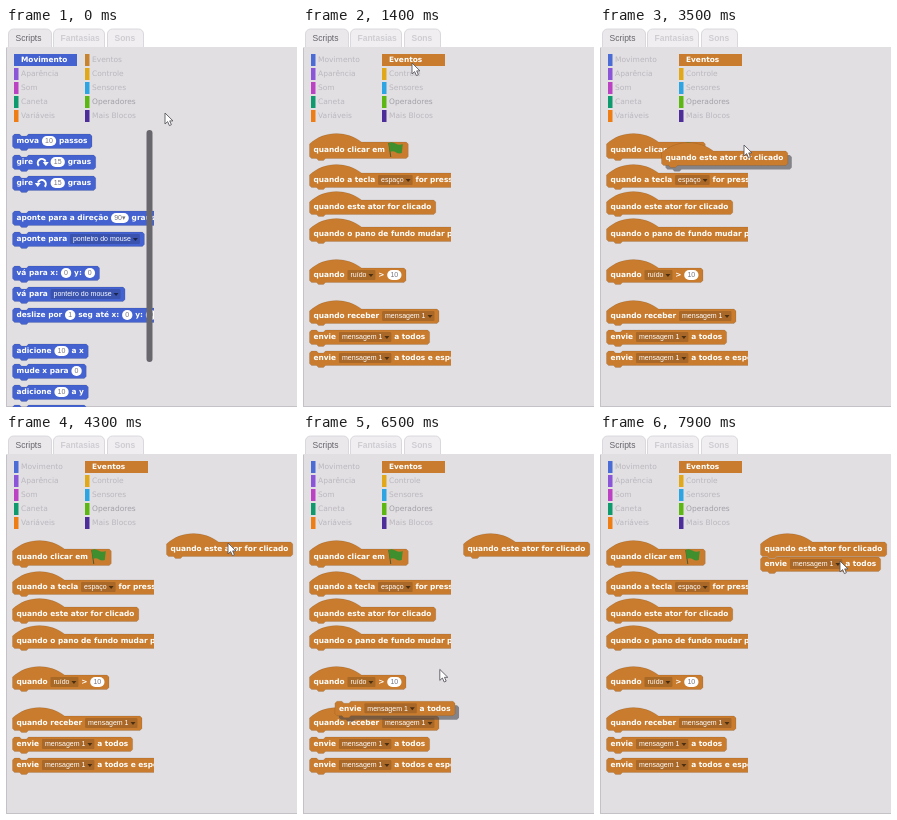
An HTML page with a canvas that plays this animation: 291 by 379 pixels, repeating every 8000 ms.

```html
<!DOCTYPE html>
<html lang="pt">
<head>
<meta charset="utf-8">
<title>Blocos</title>
<style>
html, body { margin: 0; width: 100%; height: 100%; overflow: hidden; background: #fff; }
canvas { display: block; width: 291px; height: 379px; }
</style>
</head>
<body>
<canvas id="stage" width="291" height="379"></canvas>
<script>
const ctx = document.getElementById('stage').getContext('2d');
const LOOP = 8000, STEP = 100;
const BLUE = '#4463d0', ORANGE = '#c97c2e', PANEL = '#e2dfe3';
const LABEL = 'bold 7.4px "DejaVu Sans", sans-serif';
const PLAIN = '7.5px "DejaVu Sans", sans-serif';
const VALUE = '7px "Liberation Sans", sans-serif';
const LEFT = 6.5, GAP = 2.8;

const categories = [
  ['Movimento', '#4a6cd4'], ['Aparência', '#8a55d7'], ['Som', '#bb42c3'], ['Caneta', '#0e9a6c'], ['Variáveis', '#ee7d16'],
  ['Eventos', '#c88330'], ['Controle', '#e1a91a'], ['Sensores', '#2ca5e2'], ['Operadores', '#5cb712'], ['Mais Blocos', '#4d2d99']
];

// Labels: (value) is a pill, [choice] a drop-down, {name} an icon.
const motionBlocks = [
  [113, 'mova (10) passos'], [134, 'gire {cw} (15) graus'], [155, 'gire {ccw} (15) graus'],
  [190, 'aponte para a direção (90▾) graus'], [211, 'aponte para [ponteiro do mouse]'],
  [245, 'vá para x: (0) y: (0)'], [266, 'vá para [ponteiro do mouse]'],
  [287, 'deslize por (1) seg até x: (0) y: (0)'],
  [323, 'adicione (10) a x'], [343, 'mude x para (0)'], [364, 'adicione (10) a y'], [384, 'mude y para (0)']
];
const CLICKED = [179, 'quando este ator for clicado', true];
const SEND = [309, 'envie [mensagem 1] a todos'];
const eventBlocks = [
  [122, 'quando clicar em {flag}', true], [152, 'quando a tecla [espaço] for pressionada', true],
  CLICKED, [206, 'quando o pano de fundo mudar para', true], [247, 'quando [ruído] > (10)', true],
  [288, 'quando receber [mensagem 1]', true], SEND, [330, 'envie [mensagem 1] a todos e espere']
];

// Pointer path: time, x, y
const path = [
  [0, 159, 85], [200, 159, 85], [800, 110, 36], [1400, 109, 35], [1800, 108, 40], [2500, 70, 172],
  [2900, 68, 173], [3400, 123, 124], [3500, 144, 117], [3600, 205, 109], [3700, 222, 108],
  [4600, 222, 108], [5400, 108, 282], [5600, 107, 288], [5900, 86, 306], [6300, 86, 306],
  [6800, 213, 127], [6900, 239, 127], [7000, 240, 127], [7600, 240, 126]
];

function pointerAt(t) {
  const i = path.findIndex(k => k[0] > t);
  if (i < 0) return path[path.length - 1].slice(1);
  const [t0, x0, y0] = path[i - 1], [t1, x1, y1] = path[i];
  const p = (t - t0) / (t1 - t0);
  return [x0 + (x1 - x0) * p, y0 + (y1 - y0) * p];
}

function text(str, x, y, color, font) {
  ctx.font = font;
  ctx.fillStyle = color;
  ctx.fillText(str, x, y);
}

function box(x, y, w, h, r, color) {
  ctx.beginPath();
  ctx.roundRect(x, y, w, h, r);
  ctx.fillStyle = color;
  ctx.fill();
}

function triangle(x, y, color) {
  ctx.fillStyle = color;
  ctx.beginPath();
  ctx.moveTo(x, y);
  ctx.lineTo(x + 5, y);
  ctx.lineTo(x + 2.5, y + 3);
  ctx.fill();
}

function turnArrow(x, y, flip) {
  ctx.save();
  ctx.translate(x + 6, y);
  ctx.scale(flip, 1);
  ctx.strokeStyle = ctx.fillStyle = '#fff';
  ctx.lineWidth = 2;
  ctx.beginPath();
  ctx.arc(0, 1, 4, 2.4, 5.9);
  ctx.stroke();
  ctx.beginPath();
  ctx.moveTo(1, 0);
  ctx.lineTo(7, 0);
  ctx.lineTo(4, 4);
  ctx.fill();
  ctx.restore();
}

function flag(x, y) {
  ctx.strokeStyle = '#4d5a32';
  ctx.lineWidth = 1;
  ctx.beginPath();
  ctx.moveTo(x + 1, y - 7);
  ctx.lineTo(x + 3, y + 7);
  ctx.stroke();
  ctx.fillStyle = '#3f8f2f';
  ctx.beginPath();
  ctx.moveTo(x + 1, y - 7);
  ctx.bezierCurveTo(x + 6, y - 10, x + 9, y - 3, x + 15, y - 6);
  ctx.lineTo(x + 14, y + 3);
  ctx.bezierCurveTo(x + 9, y + 5, x + 7, y - 1, x + 2, y + 2);
  ctx.fill();
}

function partWidth(part) {
  const kind = part[0], inner = part.slice(1, -1);
  if (kind === '{') return inner === 'flag' ? 16 : 12;
  ctx.font = kind === '(' || kind === '[' ? VALUE : LABEL;
  if (kind === '(') return ctx.measureText(inner).width + 6.5;
  if (kind === '[') return ctx.measureText(inner).width + 12;
  return ctx.measureText(part).width;
}

function drawPart(part, x, y, w) {
  const kind = part[0], inner = part.slice(1, -1);
  if (kind === '(') {
    box(x, y - 5, w, 10, 5, '#fff');
    text(inner, x + 3.2, y + 0.5, '#77757c', VALUE);
  } else if (kind === '[') {
    box(x, y - 5, w, 10, 1, 'rgba(0,0,0,.16)');
    text(inner, x + 3, y + 0.5, '#fff', VALUE);
    triangle(x + w - 7, y - 1, 'rgba(0,0,0,.55)');
  } else if (inner === 'flag') {
    flag(x, y);
  } else if (kind === '{') {
    turnArrow(x, y, inner === 'cw' ? 1 : -1);
  } else {
    text(part, x, y + 0.5, '#fff', LABEL);
  }
}

function outline(x, top, w, h, hat) {
  const right = x + w, bottom = top + h;
  ctx.beginPath();
  ctx.moveTo(x, top + 2);
  if (hat) {
    ctx.bezierCurveTo(x + 14, top - 11, x + 36, top - 12, x + 52, top);
  } else {
    ctx.lineTo(x + 2, top);
    ctx.lineTo(x + 7, top);
    ctx.lineTo(x + 9, top + 2);
    ctx.lineTo(x + 14, top + 2);
    ctx.lineTo(x + 16, top);
  }
  ctx.lineTo(right - 2, top);
  ctx.lineTo(right, top + 2);
  ctx.lineTo(right, bottom - 2);
  ctx.lineTo(right - 2, bottom);
  ctx.lineTo(x + 16, bottom);
  ctx.lineTo(x + 14, bottom + 2);
  ctx.lineTo(x + 9, bottom + 2);
  ctx.lineTo(x + 7, bottom);
  ctx.lineTo(x + 2, bottom);
  ctx.lineTo(x, bottom - 2);
  ctx.closePath();
}

function drawBlock([cy, label, hat], color, dx = 0, dy = 0, lifted = false) {
  const parts = label.match(/\([^)]*\)|\[[^\]]*\]|\{[^}]*\}|[^([{]+/g).map(s => s.trim()).filter(Boolean);
  const widths = parts.map(partWidth);
  const width = widths.reduce((a, b) => a + b + GAP, 0) - GAP + 8.5;
  const x = LEFT + dx, y = cy + dy, tall = label.includes('{flag}') ? 1 : 0;
  const shape = offset => outline(x + offset, y - 7 - tall + offset, width, 14.5 + tall * 2, hat);
  if (lifted) {
    shape(4);
    ctx.fillStyle = 'rgba(70,70,76,.6)';
    ctx.fill();
  }
  shape(0);
  ctx.fillStyle = color;
  ctx.fill();
  ctx.strokeStyle = 'rgba(0,0,0,.12)';
  ctx.lineWidth = 0.8;
  ctx.stroke();
  let px = x + 4;
  parts.forEach((part, i) => {
    drawPart(part, px, y, widths[i]);
    px += widths[i] + GAP;
  });
}

function drawTab(x, w, label, active) {
  box(x, 1, w, 20, [5, 5, 0, 0], active ? '#eae8eb' : '#f0eef1');
  ctx.strokeStyle = '#dad8dc';
  ctx.lineWidth = 1;
  ctx.stroke();
  text(label, x + 7, 10.5, active ? '#66646b' : '#cfcdd2',
    (active ? '' : 'bold ') + '8.5px "Liberation Sans", sans-serif');
}

function drawFrame() {
  ctx.fillStyle = '#fff';
  ctx.fillRect(0, 0, 291, 379);
  drawTab(2.5, 43, 'Scripts', true);
  drawTab(47.5, 51, 'Fantasias', false);
  drawTab(101.5, 36, 'Sons', false);
  ctx.fillStyle = PANEL;
  ctx.fillRect(0, 19, 291, 360);
  ctx.fillStyle = '#c4c2c7';
  ctx.fillRect(0, 20, 1, 359);
  ctx.fillRect(0, 378, 291, 1);
}

function drawCategories(selected) {
  categories.forEach(([name, color], i) => {
    const x = i < 5 ? 8 : 79, y = 32 + (i % 5) * 14;
    const on = name === selected;
    box(x, y - 6, on ? 63 : 4.5, 12, 0, on ? (i ? ORANGE : BLUE) : color);
    const faint = name === 'Operadores' ? '#a3a0a7' : '#bab7be';
    text(name, x + 7, y + 0.5, on ? '#fff' : faint, on ? LABEL : PLAIN);
  });
}

function drawPalette(blocks, color) {
  ctx.save();
  ctx.beginPath();
  ctx.rect(0, 95, 148, 284);
  ctx.clip();
  blocks.forEach(b => drawBlock(b, color));
  ctx.restore();
}

// A dragged block trails the pointer by one step.
function drawDragged(block, t, start, drop, grab, home) {
  if (t <= start) return;
  if (t >= drop) return drawBlock(block, ORANGE, ...home);
  const [x, y] = pointerAt(t - STEP);
  drawBlock(block, ORANGE, x - grab[0], y - grab[1], true);
}

function drawPointer([x, y]) {
  ctx.save();
  ctx.translate(x, y);
  ctx.beginPath();
  [[0, 0], [0, 11], [2.6, 8.6], [4.4, 12.6], [6.4, 11.7], [4.7, 7.9], [8, 7.9]].forEach(p => ctx.lineTo(...p));
  ctx.closePath();
  ctx.fillStyle = '#fff';
  ctx.fill();
  ctx.strokeStyle = '#5a585f';
  ctx.lineWidth = 0.9;
  ctx.stroke();
  ctx.restore();
}

function render(now) {
  const t = Math.floor((now % LOOP) / STEP) * STEP;
  const events = t >= 900;
  ctx.textBaseline = 'middle';
  drawFrame();
  drawCategories(events ? 'Eventos' : 'Movimento');
  drawPalette(events ? eventBlocks : motionBlocks, events ? ORANGE : BLUE);
  if (!events) box(140.5, 102, 6, 232, 3, '#69676e');
  drawDragged(CLICKED, t, 2900, 4000, [68, 173], [154, -65]);
  if (t >= 6800 && t < 7500) box(162, 120, 120, 3, 1, '#fff');
  drawDragged(SEND, t, 6300, 7500, [86, 306], [154, -180]);
  drawPointer(pointerAt(t));
}

const began = performance.now();
function tick() {
  render(performance.now() - began);
  requestAnimationFrame(tick);
}
tick();
</script>
</body>
</html>
```
